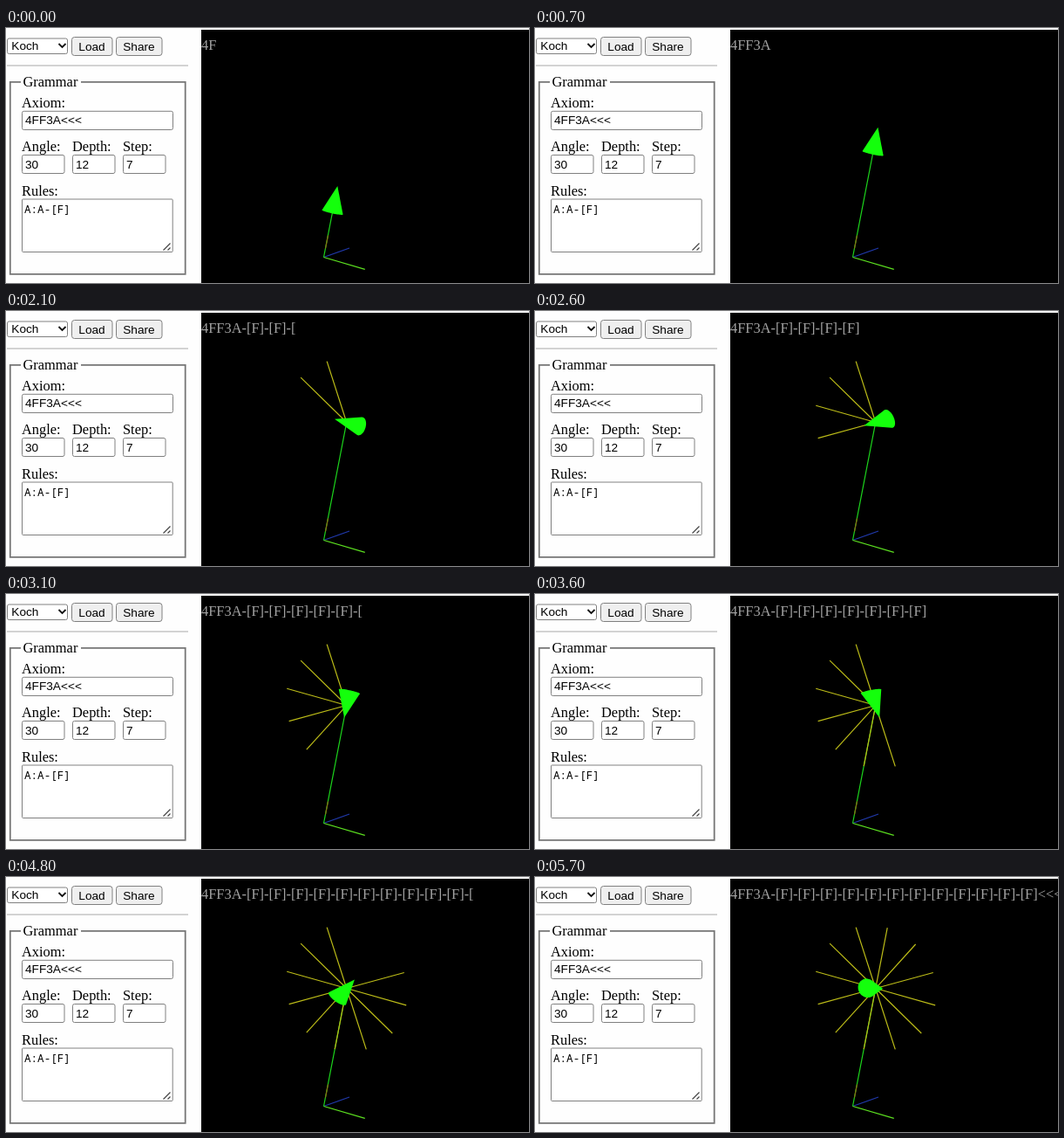
These frames come from a looping animation (600 by 292 pixels, 6200 ms). An HTML page:

```html
<!DOCTYPE html>
<html lang="en">
<head>
<meta charset="utf-8">
<title>L-system turtle</title>
<style>
  html, body { margin: 0; width: 100%; height: 100%; overflow: hidden; background: #fff; }
  svg { display: block; width: 600px; height: 292px; }
  .serif { font: 16.42px "Liberation Serif", "Times New Roman", serif; }
  .sans { font: 13.67px "Liberation Sans", Arial, sans-serif; }
  .mono { font: 12.6px "Noto Sans Mono", "DejaVu Sans Mono", monospace; }
  .box rect { fill: #fff; stroke: #808080; }
  .box .button rect { fill: #efefef; }
  .lines { fill: none; stroke-width: 1.2; }
</style>
</head>
<body>
<svg viewBox="0 0 600 292">
  <rect width="600" height="292" fill="#fefefe"/>
  <g class="box">
    <rect x="1.5" y="12" width="69" height="17.500" rx="2"/>
    <g class="button">
      <rect x="75.5" y="10.5" width="46.500" height="21" rx="3"/>
      <rect x="126.5" y="10.5" width="52.500" height="21" rx="3"/>
    </g>
    <rect x="18.5" y="95.300" width="173" height="21.200" rx="2"/>
    <rect x="18.5" y="145.5" width="48.500" height="21" rx="2"/>
    <rect x="76.5" y="145.5" width="48.500" height="21" rx="2"/>
    <rect x="134.5" y="145.5" width="48.500" height="21" rx="2"/>
    <rect x="18.5" y="196" width="172.700" height="60.500" rx="1"/>
  </g>
  <path d="M60.5 18l4 4 4-4" fill="none" stroke="#111" stroke-width="1.8"/>
  <path d="M180.500 254.500l8-8M185.500 254.500l3-3" stroke="#444" stroke-width="1.200"/>
  <path d="M1 43H209" stroke="#a8a8a8"/>
  <path d="M17 61.800H4.800V281.800H205.700V61.800H86" fill="none" stroke="#767676" stroke-width="1.800"/>
  <g class="serif">
    <text x="19.5" y="67">Grammar</text>
    <text x="18" y="91">Axiom:</text>
    <text x="18" y="141">Angle:</text>
    <text x="76" y="141">Depth:</text>
    <text x="134" y="141">Step:</text>
    <text x="18" y="192">Rules:</text>
  </g>
  <g class="sans">
    <text x="6.300" y="25.400">Koch</text>
    <text x="98.5" y="26" text-anchor="middle">Load</text>
    <text x="152.5" y="26" text-anchor="middle">Share</text>
    <text x="22" y="110.400">4FF3A&lt;&lt;&lt;</text>
    <text x="22" y="160.700">30</text>
    <text x="80" y="160.700">12</text>
    <text x="138" y="160.700">7</text>
  </g>
  <text class="mono" x="21" y="212">A:A-[F]</text>

  <rect x="224" y="2" width="376" height="290"/>
  <g class="lines">
    <path d="M364.500 262.500L394 252" stroke="#2038a8"/>
    <path d="M364.500 262.500L411.800 276.300" stroke="#5ce020"/>
    <path id="stem" stroke="#1cd41c"/>
    <path d="M366.500 252.500L369.500 237.500" stroke="#8a6a14"/>
    <path id="rays" stroke="#bcbc18"/>
  </g>
  <path id="cone" fill="#14ff0c"/>
  <text id="typed" class="serif" x="224" y="25" fill="#a2a2a2"></text>
</svg>
<script>
const LOOP = 6200;
const PROGRAM = "4FF3A" + "-[F]".repeat(12) + "<<<";
const ORIGIN = [364.5, 262.5];
// Projected unit step along each world axis; the stem lies a little further away
const UP = [13.5, -69.5], SIDE = [-68.5, -19.3], DEEP = [42, 1];
const STEM_SCALE = 0.971;
const TURN = Math.PI / 6;
const CONE = { tip: 0.2, back: 0.23, radius: 0.15 };

const el = id => document.getElementById(id);
const mix = (a, u, b, v) => [a * u[0] + b * v[0], a * u[1] + b * v[1]];
const point = p => p[0].toFixed(2) + " " + p[1].toFixed(2);
const segment = (a, b) => `M${point(a)}L${point(b)}`;

function typedCount(t) {
  if (t < 1300) return Math.min(5, 2 + Math.floor(t / 100));
  const n = Math.floor(8.3 + (t - 1500) / 84);
  return Math.min(PROGRAM.length, Math.max(6, n));
}

function runTurtle(text) {
  let pos = ORIGIN, yaw = 0, pitch = 0, pen = "stem", saved = pos;
  const paths = { stem: "", rays: "" };
  const flat = () => mix(Math.cos(yaw), UP, Math.sin(yaw), SIDE);
  for (const c of text) {
    if (c === "3") pen = "rays";
    else if (c === "-") yaw += TURN;
    else if (c === "<") pitch += TURN;
    else if (c === "[") saved = pos;
    else if (c === "]") pos = saved;
    else if (c === "F") {
      const next = mix(1, pos, pen === "stem" ? STEM_SCALE : 1, flat());
      paths[pen] += segment(pos, next);
      pos = next;
    }
  }
  const ahead = mix(Math.cos(pitch), flat(), Math.sin(pitch), DEEP);
  const across = mix(-Math.sin(yaw), UP, Math.cos(yaw), SIDE);
  const normal = mix(-Math.sin(pitch), flat(), Math.cos(pitch), DEEP);
  return { paths, pos, ahead, across, normal };
}

// Silhouette: outline around the base disc and the tip
function conePath({ pos, ahead, across, normal }) {
  const tip = mix(1, pos, CONE.tip, ahead);
  const base = mix(1, pos, -CONE.back, ahead);
  const rim = Array.from({ length: 48 }, (_, i) => {
    const a = i * Math.PI / 24;
    const spoke = mix(Math.cos(a), across, Math.sin(a), normal);
    return mix(1, base, CONE.radius, spoke);
  });
  return hull([tip, ...rim]);
}

function hull(points) {
  const sorted = points.sort((a, b) => a[0] - b[0] || a[1] - b[1]);
  const cross = (o, a, b) =>
    (a[0] - o[0]) * (b[1] - o[1]) - (a[1] - o[1]) * (b[0] - o[0]);
  const half = list => {
    const out = [];
    for (const p of list) {
      while (out.length > 1 && cross(out.at(-2), out.at(-1), p) <= 0) out.pop();
      out.push(p);
    }
    return out.slice(0, -1);
  };
  const lower = half(sorted), upper = half([...sorted].reverse());
  return "M" + [...lower, ...upper].map(point).join("L") + "Z";
}

function render(time) {
  const t = Math.floor((time % LOOP) / 100) * 100;
  const text = PROGRAM.slice(0, typedCount(t));
  const turtle = runTurtle(text);
  el("typed").textContent = text;
  el("stem").setAttribute("d", turtle.paths.stem);
  el("rays").setAttribute("d", turtle.paths.rays);
  el("cone").setAttribute("d", conePath(turtle));
}

let start;
function tick(now) {
  start ??= now;
  render(now - start);
  requestAnimationFrame(tick);
}
render(0);
requestAnimationFrame(tick);
</script>
</body>
</html>
```
